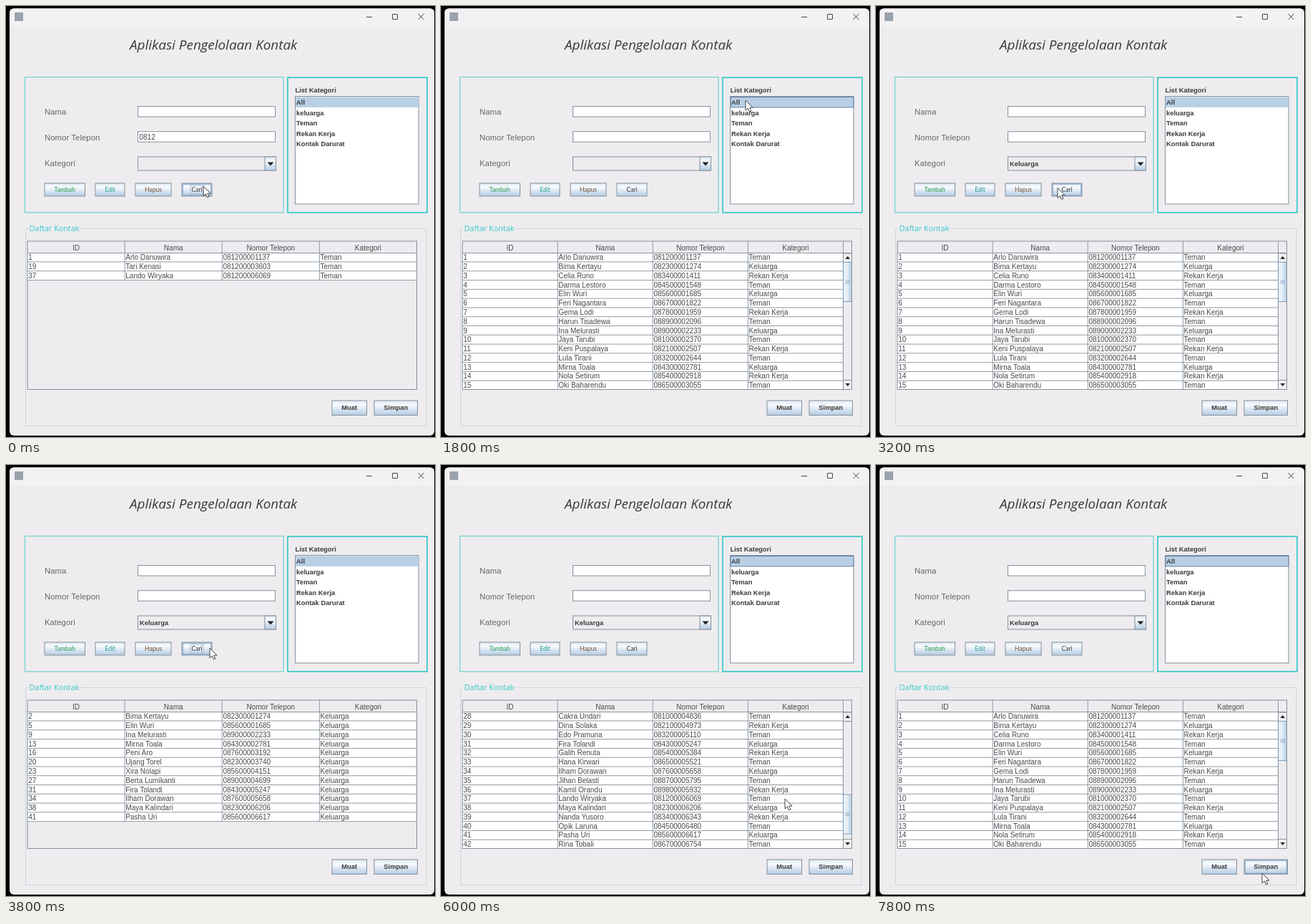
Animation of 600x603 px, one loop 8 s. Source, as an HTML page:

```html
<!DOCTYPE html>
<html lang="id">
<head>
<meta charset="utf-8">
<title>Aplikasi Pengelolaan Kontak</title>
<style>
html, body { margin: 0; width: 100%; height: 100%; overflow: hidden; background: #000; }
svg { display: block; width: 100%; height: 100%; }
text { font: 10px "Liberation Sans", Arial, sans-serif; fill: #4a4a4c; white-space: pre; }
.b { font-weight: bold; font-size: 9.4px; fill: #3a3a3c; }
.label { font-size: 11.3px; letter-spacing: .08px; fill: #66666a; }
.small { font: 8.6px Lato, sans-serif; }
.title { font: italic 18.95px "Open Sans", "Noto Sans", sans-serif; fill: #3a3a3c; }
.group { font: 10.8px "Open Sans", "Noto Sans", sans-serif; fill: #35c9cb; }
.mid { text-anchor: middle; }
</style>
</head>
<body>
<svg viewBox="0 0 600 603" xmlns="http://www.w3.org/2000/svg">
  <defs>
    <linearGradient id="ocean" x2="0" y2="1">
      <stop offset="0" stop-color="#dde8f3"/><stop offset=".3" stop-color="#f8fafd"/>
      <stop offset=".5" stop-color="#e3ecf5"/><stop offset="1" stop-color="#b4cce3"/>
    </linearGradient>
    <linearGradient id="thumb">
      <stop offset="0" stop-color="#dfe9f4"/><stop offset=".35" stop-color="#edf3f9"/>
      <stop offset="1" stop-color="#b4cce3"/>
    </linearGradient>
    <clipPath id="view"><rect x="30" y="346" width="545" height="190.5"/></clipPath>
  </defs>
  <g id="back"></g>
  <g id="live"></g>
  <path id="cursor" d="M0 0V14L3.3 11L5.6 16L7.9 15L5.7 10.2H10Z" fill="#fff" stroke="#444" stroke-width="1" stroke-linejoin="round"/>
</svg>
<script>
const $ = id => document.getElementById(id);
const LOOP = 8000, STEP = 200;
const EDGE = '#84909c', TEAL = '#35c9c8';
const ROW = 12.79, TOP = 345.6, VIEW = 15;

const names = ('Arlo Danuwira,Bima Kertayu,Celia Runo,Darma Lestoro,Elin Wuri,Feri Nagantara,Gema Lodi,' +
  'Harun Tisadewa,Ina Melurasti,Jaya Tarubi,Keni Puspalaya,Lula Tirani,Mirna Toala,Nola Setirum,' +
  'Oki Baharendu,Peni Aro,Rano Jalitan,Sela Tuni,Tari Kenasi,Ujang Torel,Vera Lokasanti,' +
  'Wisnu Garadipa,Xira Nolapi,Yoga Pentari,Zaki Mandaru,Alma Witoro,Berta Lumikanti,Cakra Undari,' +
  'Dina Solaka,Edo Pramuna,Fira Tolandi,Galih Renuta,Hana Kirwari,Ilham Dorawan,Jihan Belasti,' +
  'Kamil Orandu,Lando Wiryaka,Maya Kalindari,Nanda Yusoro,Opik Laruna,Pasha Uri,Rina Tobali,' +
  'Seno Galuhra,Tomi Arkana').split(',');
const kinds = { T: 'Teman', K: 'Keluarga', R: 'Rekan Kerja' };

const contacts = names.map((name, i) => {
  const k = i % 18, d = k % 9;
  const prefix = k < 9 ? `${d + 1}${(d + 2) % 10}` : `${d + 1}${d}`;
  return [String(i + 1), name, `08${prefix}0000${1000 + (i + 1) * 137}`, kinds['TKRTKTRTKTRTKRTKTR'[k]]];
});
const byPrefix = contacts.filter(c => c[2].startsWith('0812'));
const family = contacts.filter(c => c[3] === 'Keluarga');

const rect = (x, y, w, h, fill, stroke = 'none', sw = 1, extra = '') =>
  `<rect x="${x}" y="${y}" width="${w}" height="${h}" fill="${fill}" stroke="${stroke}" stroke-width="${sw}" ${extra}/>`;
const path = (d, stroke, sw = 1, fill = 'none') =>
  `<path d="${d}" fill="${fill}" stroke="${stroke}" stroke-width="${sw}"/>`;
const text = (x, y, s, cls = '', fill = '') =>
  `<text x="${x}" y="${y}" class="${cls}"${fill && ` style="fill:${fill}"`}>${s}</text>`;

const buttons = [
  ['Tambah', 54, 248, 56.5, 18, 'small', '#259a55'],
  ['Edit', 125, 248, 41, 18, 'small', '#259f90'],
  ['Hapus', 181, 248, 50, 18, 'small', '#75503a'],
  ['Cari', 246, 248, 42, 18, 'small', '#3a3a3e'],
  ['Muat', 456, 552, 48.5, 20.5, 'b', ''],
  ['Simpan', 515, 552, 60.5, 20.5, 'b', '']
];

function button([label, x, y, w, h, cls, fill], cx, cy, focused) {
  const hover = cx >= x && cx <= x + w && cy >= y && cy <= y + h;
  return rect(x, y, w, h, 'url(#ocean)', EDGE) +
    (hover ? rect(x + 1, y + 1, w - 2, h - 2, 'none', '#8fa9c6', 1.6) : '') +
    (focused ? rect(x + 12, y + 3, w - 24, h - 6, 'none', '#a3b8cc', .9) : '') +
    text(x + w / 2, y + h / 2 + 3.2, label, cls + ' mid', fill);
}

function drawBack() {
  const field = y => rect(184.5, y, 192, 14.5, '#fff', EDGE);
  return rect(5, 3.5, 594, 597.5, '#eeecee', 'none', 1, 'rx="6"') +
    path('M5 29V10Q5 3.5 11 3.5H593Q599 3.5 599 10V29Z', 'none', 0, '#f4f1f5') +
    rect(12, 9, 12, 12, '#9aa3ad') +
    path('M504 15.5H512', '#444') + rect(540.5, 11.5, 7, 7, 'none', '#444', 1, 'rx=".5"') +
    path('M576.5 11L584.5 19M584.5 11L576.5 19', '#444') +
    text(173, 61, 'Aplikasi Pengelolaan Kontak', 'title') +
    rect(26.5, 99.5, 361.5, 189.5, 'none', '#6fd2d0', 1.2) +
    rect(394, 100, 195, 189, 'none', TEAL, 1.7) +
    text(54, 152.3, 'Nama', 'label') + text(54, 187.7, 'Nomor Telepon', 'label') +
    text(54, 224.3, 'Kategori', 'label') + field(140.5) + field(175.7) +
    rect(184.5, 211, 193, 19, '#eeecee', EDGE) +
    rect(362, 211, 15.5, 19, 'url(#ocean)', EDGE) +
    path('M365.5 218.5H374.5L370 223.5Z', 'none', 0, '#222') +
    text(404.5, 120.5, 'List Kategori', 'b') +
    rect(404.5, 126.5, 172.5, 150.5, '#fff', EDGE) +
    path('M31 311.5H27.5V587.5H588V311.5H102', '#c9d7dd') +
    text(32.5, 315, 'Daftar Kontak', 'group');
}

function list(focused) {
  const items = ['All', 'keluarga', 'Teman', 'Rekan Kerja', 'Kontak Darurat'];
  return rect(405, 127.5, 172, 14.3, '#b8cfe5', focused ? '#6382a6' : 'none') +
    items.map((s, i) => text(406, 138.4 + i * 14.45, s, 'b')).join('');
}

function scrollbar(first) {
  const y = 358.5 + first * 3.8;
  let s = rect(562.5, 346, 12, 190.5, '#eeecee', EDGE) +
    rect(562.5, 346, 12, 12.5, '#f0eff1', EDGE) + rect(562.5, 523.5, 12, 13, '#f0eff1', EDGE) +
    path('M565.5 354H572L568.75 350Z', 'none', 0, '#222') +
    path('M565.5 528H572L568.75 532Z', 'none', 0, '#222') +
    rect(562.5, y, 12, 55, 'url(#thumb)', '#7f9cbd');
  for (let i = 0; i < 3; i++) s += path(`M565.5 ${y + 25.5 + i * 2}H572`, '#87a3c2', .8);
  return s;
}

function table(rows, first) {
  const full = rows.length > VIEW;
  const right = full ? 562.5 : 574.5, w = (right - 30) / 4;
  const heads = ['ID', 'Nama', 'Nomor Telepon', 'Kategori'];
  const shown = rows.slice(first, first + VIEW);
  const h = shown.length * ROW;
  let head = rect(30, 329, 544.5, 17, '#eeecee'), body = rect(30, TOP, right - 30, h, '#fff');
  shown.forEach((r, i) => {
    const y = TOP + i * ROW;
    r.forEach((s, c) => body += text(30 + c * w + 1.2, y + 9.6, s));
    body += path(`M30 ${y + ROW - .4}H${right}`, EDGE, .9);
  });
  heads.forEach((s, c) => {
    const x = 30 + (c + 1) * w;
    head += text(x - w / 2, 341.6, s, 'mid') + path(`M${x} 329V346`, EDGE, .9);
    body += path(`M${x} ${TOP}V${TOP + h}`, EDGE, .9);
  });
  return head + `<g clip-path="url(#view)">${body}</g>` + (full ? scrollbar(first) : '') +
    path('M30 345.6H574.5', EDGE) + rect(30, 329, 544.5, 207.5, 'none', EDGE);
}

function popup(cy) {
  const hot = cy < 246.5 ? 0 : 1;
  return rect(185, 231, 193, 58.5, '#eeecee') +
    rect(185, 231.5 + hot * 14.5, 193, 14.5, '#a3b8cc') +
    rect(185, 231, 192.5, 58.5, 'none', '#55606c') +
    ['Keluarga', 'Teman', 'Rekan Kerja'].map((s, i) => text(186.5, 257 + i * 14.4, s, 'b')).join('');
}

// time, x, y of the pointer tip
const route = [
  [0, 276, 252], [200, 276, 252], [600, 345, 374], [800, 345, 374], [1400, 424, 134], [1600, 426, 132],
  [1800, 426, 132], [2200, 369, 221], [2400, 368, 222], [2600, 307, 241], [2800, 232, 252],
  [3000, 225, 253], [3400, 283, 256], [3600, 285, 256], [4000, 285, 256], [4600, 422, 134],
  [5000, 422, 134], [5600, 481, 467], [7000, 481, 467], [7600, 540, 571], [8000, 540, 571]
];
function pointer(t) {
  const i = route.findIndex(p => p[0] > t);
  const [t0, x0, y0] = route[i - 1], [t1, x1, y1] = route[i];
  const u = (t - t0) / (t1 - t0), e = u * u * (3 - 2 * u);
  return [x0 + (x1 - x0) * e, y0 + (y1 - y0) * e];
}

// wheel moves three rows per notch
function scrollRow(t) {
  const notches = [0, 1, 4, 7, 9, 6, 3, 1];
  return 3 * (notches[(t - 5200) / STEP] || 0);
}

const within = (t, a, b) => t >= a && t < b;

function render(t) {
  const [cx, cy] = pointer(t);
  const open = within(t, 2400, 3000);
  const rows = t < 1800 ? byPrefix : within(t, 3800, 4800) ? family : contacts;
  const cariFocus = t < 1800 || within(t, 3600, 4800);
  $('live').innerHTML =
    (t < 1800 ? text(186.5, 187.1, '0812') : '') +
    (t >= 3000 ? text(187, 224, 'Keluarga', 'b') : '') +
    list(within(t, 1800, 2400) || t >= 4800) +
    buttons.map(b => button(b, cx, cy, b[0] === 'Cari' && cariFocus)).join('') +
    table(rows, scrollRow(t)) + (open ? popup(cy) : '');
  $('cursor').setAttribute('transform', `translate(${cx} ${cy})`);
}

$('back').innerHTML = drawBack();
const start = performance.now();
let last = -1;
function tick() {
  const t = Math.floor((performance.now() - start) % LOOP / STEP) * STEP;
  if (t !== last) render(last = t);
  requestAnimationFrame(tick);
}
tick();
</script>
</body>
</html>
```
